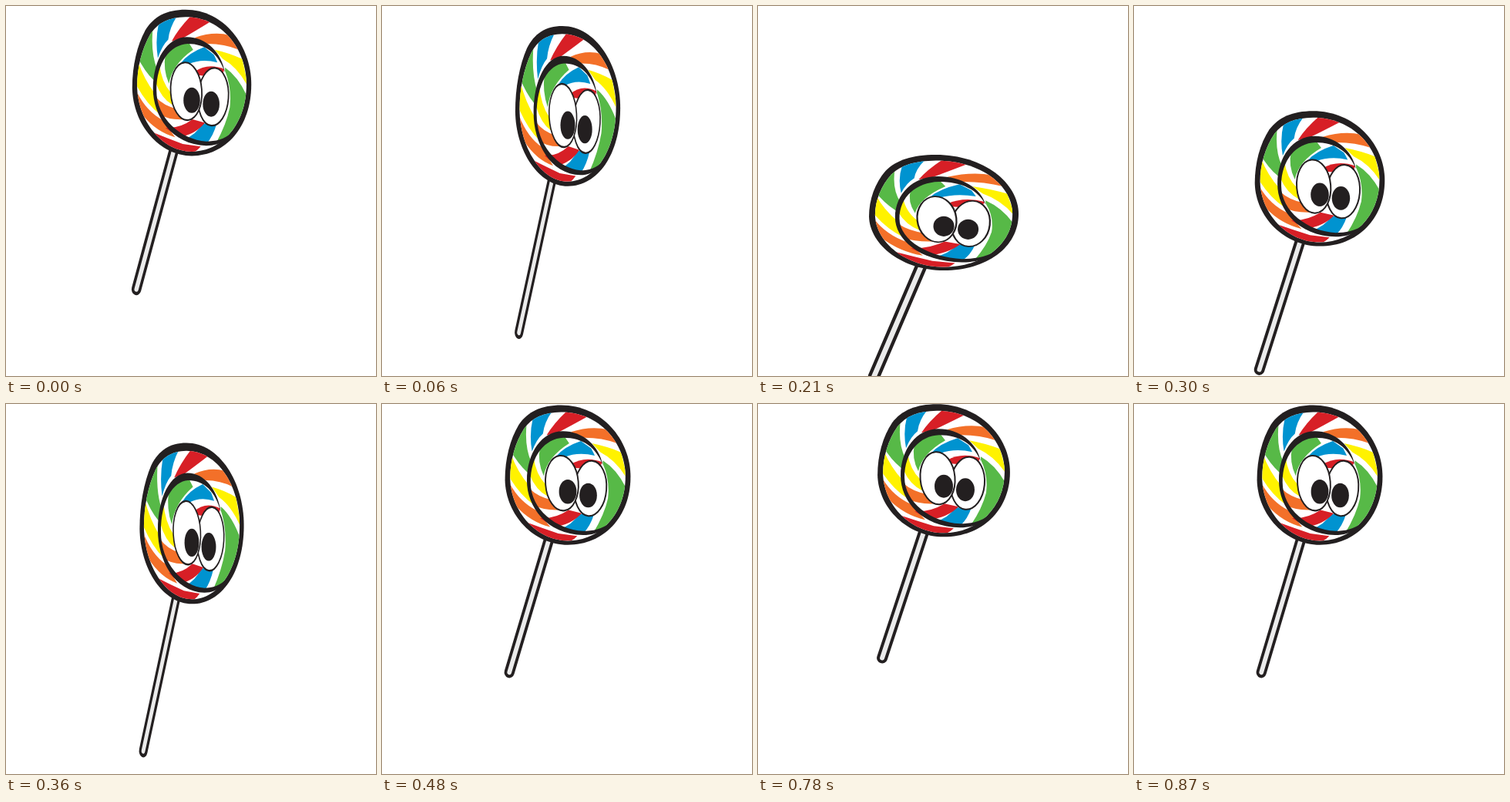
These frames come from a looping animation (480 by 480 pixels, 900 ms). An HTML page:

```html
<!DOCTYPE html>
<html lang="en">
<head>
<meta charset="utf-8">
<title>Bouncing lollipop</title>
<style>
  html, body { margin: 0; width: 100%; height: 100%; overflow: hidden; background: #fff; }
  svg { display: block; width: 100vw; height: 100vh; }

  /* One fall, played forwards then backwards: 2 x 450 ms */
  .pop {
    transform-origin: 241px 168px;
    transform: translateY(var(--y)) scale(calc(2 - var(--s)), var(--s));
    animation: fall 450ms step-end -210ms infinite alternate;
  }
  @keyframes fall {
    0%       { --y: 0px;     --s: 1; }
    20%      { --y: .3px;    --s: 1.001; }
    26.6667% { --y: 1.7px;   --s: 1.006; }
    33.3333% { --y: 5px;     --s: 1.022; }
    40%      { --y: 10.5px;  --s: 1.053; }
    46.6667% { --y: 22px;    --s: 1.102; }
    53.3333% { --y: 39px;    --s: 1.163; }
    60%      { --y: 61px;    --s: 1.208; }
    66.6667% { --y: 86.5px;  --s: 1.214; }
    73.3333% { --y: 114.5px; --s: 1.134; }
    80%      { --y: 139.5px; --s: 1.02; }
    86.6667% { --y: 158.5px; --s: .917; }
    93.3333%, 100% { --y: 171.5px; --s: .872; }
  }

  .ink { fill: #231f20; }
  .red { fill: #d71f26; }
  .orange { fill: #f37029; }
  .yellow { fill: #fff200; }
  .green { fill: #57b947; }
  .blue { fill: #0093d0; }
  .stick { fill: none; stroke-linecap: round; }
  .eye { fill: #fff; stroke: #231f20; stroke-width: 2; }
</style>
</head>
<body>
<svg viewBox="0 0 480 480">
  <defs>
    <clipPath id="disc"><path id="face" d="M232 8.500C208 9 192 15 181 29C169 46 162 68 162 90C163 131 198 167 241 167C286 167 320 133 320 88C320 46 284 8.500 232 8.500Z"/></clipPath>
  </defs>
  <g class="pop">
    <path class="stick" d="M217 160L161 329" stroke="#231f20" stroke-width="14"/>
    <path class="stick" d="M217 160L161 329" stroke="#ebebeb" stroke-width="6"/>

    <path class="ink" d="M232 0C205 0 186 8 174 24C162 42 155 66 155 92C156 135 194 172 241 172C290 172 327 138 327 88C327 42 287 0 232 0Z"/>
    <use href="#face" fill="#fff"/>

    <g clip-path="url(#disc)">
      <!-- outer turn, clockwise from the bottom -->
      <path class="red" d="M181 143Q205 151 228 158L254 161Q242 173 215 173Z"/>
      <path class="orange" d="M160 94Q174 119 199 130L217 150Q190 144 170 124L155 112Z"/>
      <path class="yellow" d="M163 60Q172 82 188 99L195 123Q174 110 158 84Z"/>
      <path class="green" d="M185 20Q181 50 191 70L186 83Q172 72 161 53Z"/>
      <path class="blue" d="M193 17Q188 36 192 57Q198 42 207 35Q209 20 221 6L200 5Z"/>
      <path class="red" d="M240 7Q222 22 212 37L229 33Q246 25 270 13Z"/>
      <path class="orange" d="M296 30Q272 25 245 33L264 40Q288 40 309 47Z"/>
      <path class="yellow" d="M314 58Q296 51 274 47L286 58Q308 68 323 92Z"/>
      <path class="green" d="M289 68Q310 80 323 106L310 142L276 157Q291 135 296 115Q299 92 289 72Z"/>
      <!-- inner turn -->
      <path class="blue" d="M229 153Q248 147 256 134L277 134Q272 149 262 158Q245 158 229 153Z"/>
      <path class="red" d="M203 139Q224 140 242 129L260 133Q246 147 222 150Z"/>
      <path class="orange" d="M189 103Q200 113 220 117L230 129Q208 130 194 123Z"/>
      <path class="yellow" d="M194 63Q197 85 211 98L213 112Q197 104 189 86Z"/>
      <path class="green" d="M203 52Q199 70 208 87Q213 64 243 47L236 38Q214 41 203 52Z"/>
      <path class="blue" d="M225 63Q236 51 259 44L273 53Q276 58 278 62Q255 57 236 64Z"/>
      <path class="red" d="M245 73Q264 62 288 70L284 80L250 77Z"/>
    </g>

    <path class="ink" d="M289 74C284 50 262 32 234 32C206 32 185 58 185 93C185 125 212 159 262 160C285 160 300 150 313 131L300 144C288 153 275 155 262 155C225 153 190 128 190 95C190 62 210 41 235 40C262 40 280 52 289 74Z"/>

    <ellipse class="eye" cx="272" cy="102.500" rx="22" ry="34" transform="rotate(5 272 102.500)"/>
    <ellipse class="ink" cx="269" cy="111" rx="12" ry="15"/>
    <ellipse class="eye" cx="233" cy="96" rx="22.500" ry="34" transform="rotate(-5 233 96)"/>
    <ellipse class="ink" cx="241" cy="106.500" rx="12" ry="15"/>
  </g>
</svg>
</body>
</html>
```
